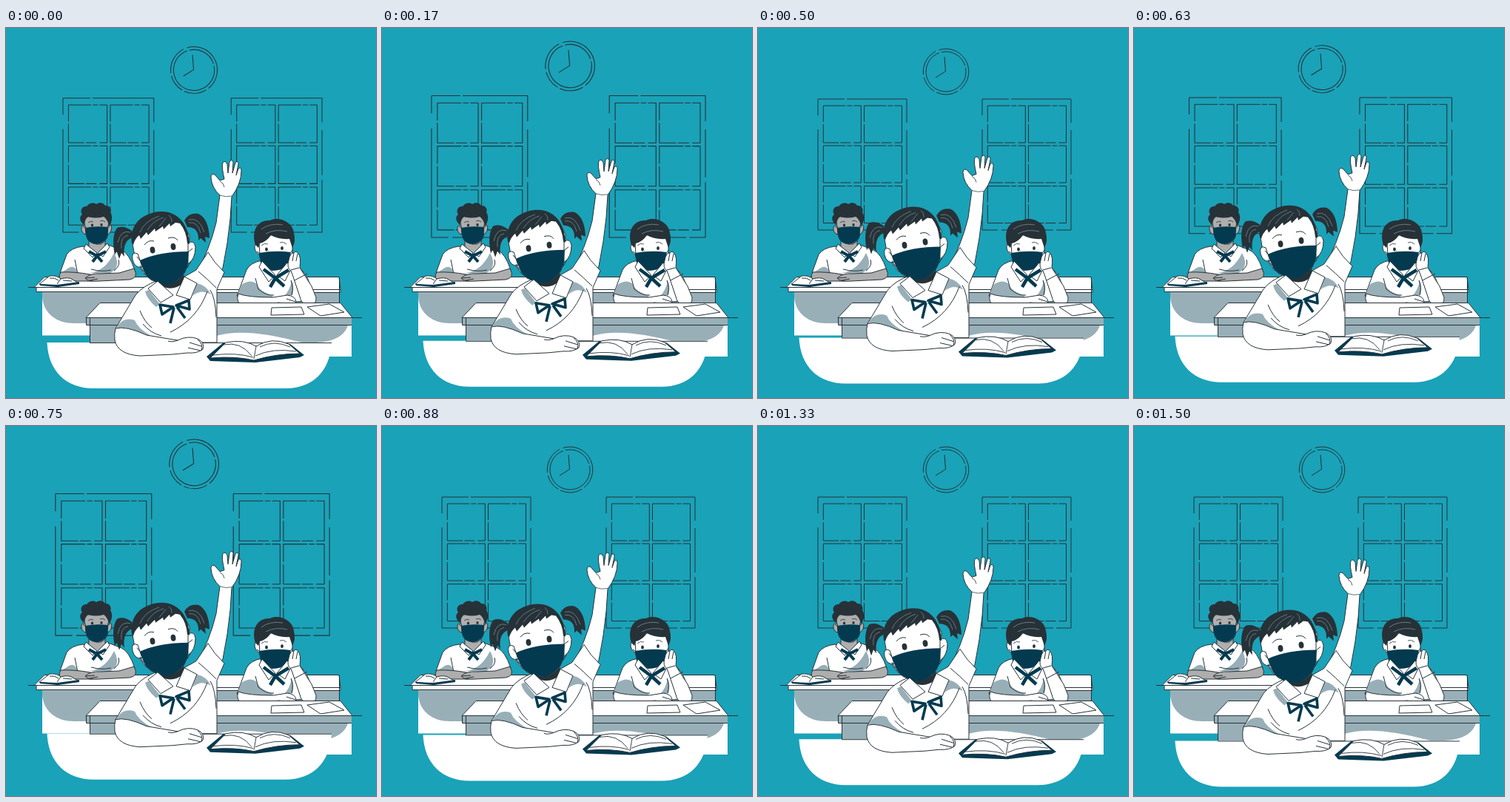
Recreate the animation shown at these times as an HTML page with a canvas. Size 500x500 px, loop 1540 ms.

```html
<!DOCTYPE html>
<html lang="en">
<head>
<meta charset="utf-8">
<title>Classroom</title>
<style>
html, body { margin: 0; width: 100%; height: 100%; overflow: hidden; background: #1aa2b8; }
canvas { display: block; width: 500px; height: 500px; }
</style>
</head>
<body>
<canvas id="stage"></canvas>
<script>
const LOOP = 1540, BEAT = 1520, LEAD = 35;
const TEAL = '#1aa2b8', INK = '#263238', NAVY = '#033a50', SHADE = '#98afb8', SKIN = '#aeaeae', WHITE = '#fff';
const canvas = document.getElementById('stage');
const ctx = canvas.getContext('2d');
const ratio = window.devicePixelRatio || 1;
canvas.width = canvas.height = 500 * ratio;

const cache = new Map();
function path(d) {
  if (!cache.has(d)) cache.set(d, new Path2D(d));
  return cache.get(d);
}
function fill(d, color) {
  ctx.fillStyle = color;
  ctx.fill(path(d));
}
function line(d, width = 1, color = INK) {
  ctx.strokeStyle = color;
  ctx.lineWidth = width;
  ctx.stroke(path(d));
}
function shape(d, color = WHITE, width = 1) {
  fill(d, color);
  line(d, width);
}
function oval(x, y, rx, ry, color = INK, tilt = 0) {
  ctx.fillStyle = color;
  ctx.beginPath();
  ctx.ellipse(x, y, rx, ry, tilt, 0, 7);
  ctx.fill();
}
function dashed(dash, draw) {
  ctx.setLineDash(dash);
  draw();
  ctx.setLineDash([]);
}
function ring(x, y, r, start) {
  ctx.beginPath();
  ctx.arc(x, y, r, start, start + Math.PI * 2);
  ctx.stroke();
}

function drawWindow(x) {
  dashed([36, 3, 113, 10, 60, 6, 89, 4, 70, 5, 157, 19, 22, 0], () => ctx.strokeRect(x, 96, 120, 177));
  for (const px of [7.3, 62.5]) {
    for (const py of [105, 159, 213.6]) {
      dashed([30, 2, 7, 2, 70, 4, 14, 2, 46, 3], () => ctx.strokeRect(x + px, py, 51, 50));
    }
  }
}

function drawWall(scale) {
  ctx.save();
  ctx.translate(252, 151);
  ctx.scale(scale, scale);
  ctx.translate(-252, -151);
  ctx.strokeStyle = INK;
  ctx.lineWidth = 1;
  drawWindow(81);
  drawWindow(303);
  dashed([46, 4, 30, 3, 24, 4, 38, 5, 40, 3], () => ring(254, 59, 30.8, -0.6));
  dashed([104, 3, 40, 3], () => ring(254, 59, 27, 0.5));
  line('M252 39L253.5 58.5L240 67');
  ctx.restore();
}

function drawBackDesk() {
  fill('M49 357H207V415.5H49Z', WHITE);
  fill('M49 357H207V399H92C68 399 51 386 49 364Z', SHADE);
  shape('M52 336.5H207V350.5H38Z');
  shape('M41 350.5H207V356.5H41Z');
  line('M30 350.5H207');
  fill('M280 354H450V372H280Z', SHADE);
  shape('M280 336.5H450L452 353.5H280Z');
  shape('M280 353.5H452V357.5H280Z');
  line('M450.5 337V371');
}

function drawLeftBoy() {
  shape('M104 295Q88 297 82 306L73 331Q95 332 105 338H150L174 327Q166 304 156 300L138 293L123 304Z');
  fill('M82 326Q94 317 97 333L74 331ZM146 304Q153 316 148 326L140 332L112 331Q134 329 146 304Z', SHADE);
  line('M93 313L97 333M152 313Q155 321 146 328M115 326Q130 330 142 327');
  shape('M112 286V296L123 306L134 295V284Z', SKIN);
  shape('M106 255Q106 273 109 282Q116 294 128 292Q138 288 139 271V254Z', SKIN);
  shape('M107 267C100 264 100 278 108 279ZM138 266C145 263 144 277 137 279Z', SKIN);
  fill('M105 266C99 260 99 255 103 252C99 246 104 240 109 241C113 235 120 236 122 238C128 234 133 238 134 240C140 239 143 245 141 249C145 255 143 263 139 268C138 261 135 257 132 255Q121 258 111 255Q107 258 105 266Z', INK);
  oval(116.5, 266.5, 1.6, 2.1);
  oval(129, 266, 1.6, 2.1);
  line('M111 263Q114 260 118 262M127 261Q131 259 134 262', 0.8);
  fill('M107 270Q121 267 138 269L137 283Q131 292 122 292Q112 291 109 284Z', NAVY);
  line('M107 270L104 268M138 269L141 267');
  shape('M108 292L123 304L117 310L105 298ZM137 291L124 304L131 309L140 296Z');
  line('M112 302L123 308L135 302M123 308L117 316M123 308L130 316', 4, NAVY);
  shape('M74 330Q92 329 114 333L126 338Q123 343 110 342H80Q68 339 74 330Z', SKIN);
  shape('M173 325Q180 338 167 340L126 342Q110 343 107 338Q114 331 128 332L153 331Z', SKIN);
  line('M108 338L120 337M113 341L124 339');
  shape('M45 346L59 335Q69 334 74 339Q85 336 90 340L99 345L69 349Z');
  fill('M45 346L69 347L99 343V346L70 350L46 348Z', NAVY);
  line('M74 339L69 346M59 338Q66 337 71 341M77 341L89 342');
}

function drawRightBoy() {
  shape('M346 314Q330 317 325 327L312 362Q320 372 350 373L405 369L411 347Q406 331 393 321L380 314Z');
  fill('M318 347Q330 339 338 345Q342 356 361 362L358 366L313 360ZM386 341Q390 350 387 361L376 362Q384 354 386 341Z', SHADE);
  line('M337 338L341 353M341 353Q352 362 362 361M385 341Q389 350 386 361');
  shape('M352 319V329L365 337L378 326V314Z');
  shape('M340 281Q340 307 346 317Q357 328 371 326Q385 320 387 302V278Z');
  shape('M342 291C334 288 334 304 343 306Z');
  fill('M337 293C331 274 340 259 357 260C368 254 388 262 389 277Q392 288 387 297L383 285Q368 286 358 280Q352 289 343 291L341 297Z', INK);
  line('M345 272Q357 263 374 266M351 278Q364 271 380 275', 0.7, '#889aa2');
  oval(352, 299, 1.9, 2.5);
  oval(373, 297.5, 1.9, 2.5);
  line('M345 294Q349 290 354 292M370 290Q375 288 379 292', 0.8);
  fill('M342 304Q364 300 385 303L382 318Q373 328 360 328Q348 325 344 318Z', NAVY);
  line('M342 304L339 302M385 303L388 299');
  shape('M346 315L364 334L355 343L342 323ZM380 317L366 334L377 342L386 324Z');
  line('M348 326L364 338L382 327M364 338L357 350M364 338L376 349', 4.5, NAVY);
  shape('M385 328Q379 324 382 314Q384 303 389 304Q392 300 395 305Q399 309 397 324L413 349L419 364Q420 374 410 375Q399 374 397 363L387 333Z');
  line('M389 304L387 315M394 305L392 315M385 327L396 324M390 341L407 332');
  shape('M314 359Q326 364 361 364L380 361Q391 362 392 370Q390 377 374 375L349 378L323 376Q309 372 314 359Z');
  line('M367 371L387 373M379 366L391 370');
}

function drawMiddleDesk() {
  fill('M113 392H467V444H113Z', WHITE);
  fill('M113 392H467V402H462C456 420 436 425 414 425H113Z', SHADE);
  fill('M284 425V416C312 408 348 411 400 425Z', WHITE);
  shape('M127 371.5H452L468 391.5H108Z');
  fill('M109 392H467V401H109Z', SHADE);
  line('M108 391.5H481M467 401.5H108.5V391.5M113.5 392V425');
  shape('M359 378L399 377L403 387L358 388Z');
  shape('M407 377L437 373L457 384L425 389Z');
}

function drawTable() {
  fill('M55.5 425H440C438 464 414 487 378 487H118C82 487 57 464 55.5 425Z', WHITE);
  line('M113 425.5H440');
}

function drawRaisedArm() {
  shape('M257 331Q275 300 284 263L289 226Q278 216 277 202Q277 196 282 198L289 206L295 204Q291 187 293 182Q296 178 299 184L300 196L302 181Q305 176 307 181L306 196L310 182Q314 178 314 184L311 199L314 190Q318 187 318 193Q318 210 305 228L303 258Q300 290 293 324L280 345Z');
  line('M289 207Q294 209 295 215', 0.8);
  line('M289 226Q297 229 305 227', 0.7);
}

function drawBody() {
  shape('M205 341Q184 349 175 361L148 406Q150 418 180 419L190 425H285V353L295 330Q281 317 273 303L257 327L241 336Z');
  fill('M151 402Q160 390 174 395Q178 406 196 416L190 424Q164 418 149 408ZM193 354L208 373L203 377Q190 366 188 356ZM258 345Q270 347 277 360Q264 352 252 362Z', SHADE);
  line('M181 382Q187 397 197 405M185 400Q195 412 210 416M276 354Q283 365 284 391M272 356Q258 394 222 411M260 329Q273 340 284 351');
  shape('M148 406Q162 402 190 415L232 422Q246 415 259 420Q269 425 266 434Q259 440 245 439L225 441L181 443Q151 441 147 422Q146 413 148 406Z');
  line('M232 422Q224 425 219 423M248 425L264 430M246 432L263 436M259 421Q267 427 264 436');
}

function drawHead() {
  fill('M170 274Q159 266 150 270Q142 282 147 307Q149 302 150 303L153 312L156 304L160 309Q157 288 171 283ZM241 260Q247 249 260 251Q274 258 275 284L269 282L270 290L263 284L260 287Q261 269 245 269Z', INK);
  line('M168 276Q155 272 151 290M165 280Q154 282 156 298M247 259Q261 255 268 276M247 263Q259 261 263 277', 0.7, '#82969f');
  fill('M204 338L240 327L241 344Q222 359 205 345Z', INK);
  shape('M171 282Q170 305 182 325Q193 345 216 346Q239 343 245 322L248 281L238 262L187 263Z');
  shape('M246 291Q254 285 256 296Q256 312 246 319ZM178 305Q169 301 171 313Q174 325 184 323Z');
  fill('M170 291C166 266 184 249 210 248C233 248 247 266 248 292L245 291Q244 275 235 264L229 263L222 268L221 264L213 272L212 268L202 275L201 271L192 280L190 276L182 285L180 280Q174 285 172 293Z', INK);
  line('M181 276Q187 261 207 254M191 273Q199 260 213 256M207 268L216 257M224 262Q225 257 220 253', 0.7, '#82969f');
  oval(198, 300, 3.4, 4.5, INK, -0.15);
  oval(226, 295.5, 3.4, 4.5, INK, -0.15);
  line('M187 293Q192 286 200 288M219 284Q228 281 232 287');
  fill('M181 314Q207 302 247 302L245 323Q240 338 224 345Q212 349 200 342Q188 336 186 328Z', NAVY);
  line('M181 314L177 309M247 302L252 298M186 329L181 321M245 324L250 315');
}

function drawCollar() {
  shape('M205 342L226 361L209 371L192 352ZM241 336L230 361L249 367L258 345Z');
  line('M226 377L208 374L211 387ZM230 375L247 368L248 380ZM227 378L222 399M231 377L242 392', 3.6, NAVY);
}

function drawBook() {
  fill('M271 444L294 425L339 430L384 427L403 442L397 445L337 452L276 450Z', NAVY);
  shape('M276 446L297 425Q321 420 338 430Q359 417 382 427L397 440Q365 440 335 449Q309 443 276 446Z');
  line('M338 430L335 447M280 442Q310 438 334 445M294 428Q317 423 332 443M343 431Q362 421 384 431M337 443Q360 432 392 437', 0.9);
}

// Two linear beats of ten percent, then a rest.
function beat(t) {
  const u = (t + LEAD) / BEAT;
  const stops = [[0, 0], [.1, .1], [.3, 0], [.4, 0], [.5, .1], [.6, 0], [2, 0]];
  const i = stops.findIndex(s => s[0] > u);
  const [a, from] = stops[i - 1], [b, to] = stops[i];
  return 1 + from + (to - from) * (u - a) / (b - a);
}
function lift(t) {
  const u = (t + LEAD) % LOOP / LOOP;
  return 10 * (1 - Math.abs(2 * u - 1));
}

function draw(t) {
  ctx.setTransform(ratio, 0, 0, ratio, 0, 0);
  ctx.lineJoin = 'round';
  ctx.fillStyle = TEAL;
  ctx.fillRect(0, 0, 500, 500);
  drawWall(beat(t));
  drawBackDesk();
  drawLeftBoy();
  drawRightBoy();
  drawMiddleDesk();
  ctx.translate(0, 0.5 - lift(t));
  drawTable();
  drawRaisedArm();
  drawBody();
  drawHead();
  drawCollar();
  drawBook();
}

const start = performance.now();
function tick() {
  draw((performance.now() - start) % LOOP);
  requestAnimationFrame(tick);
}
tick();
</script>
</body>
</html>
```
